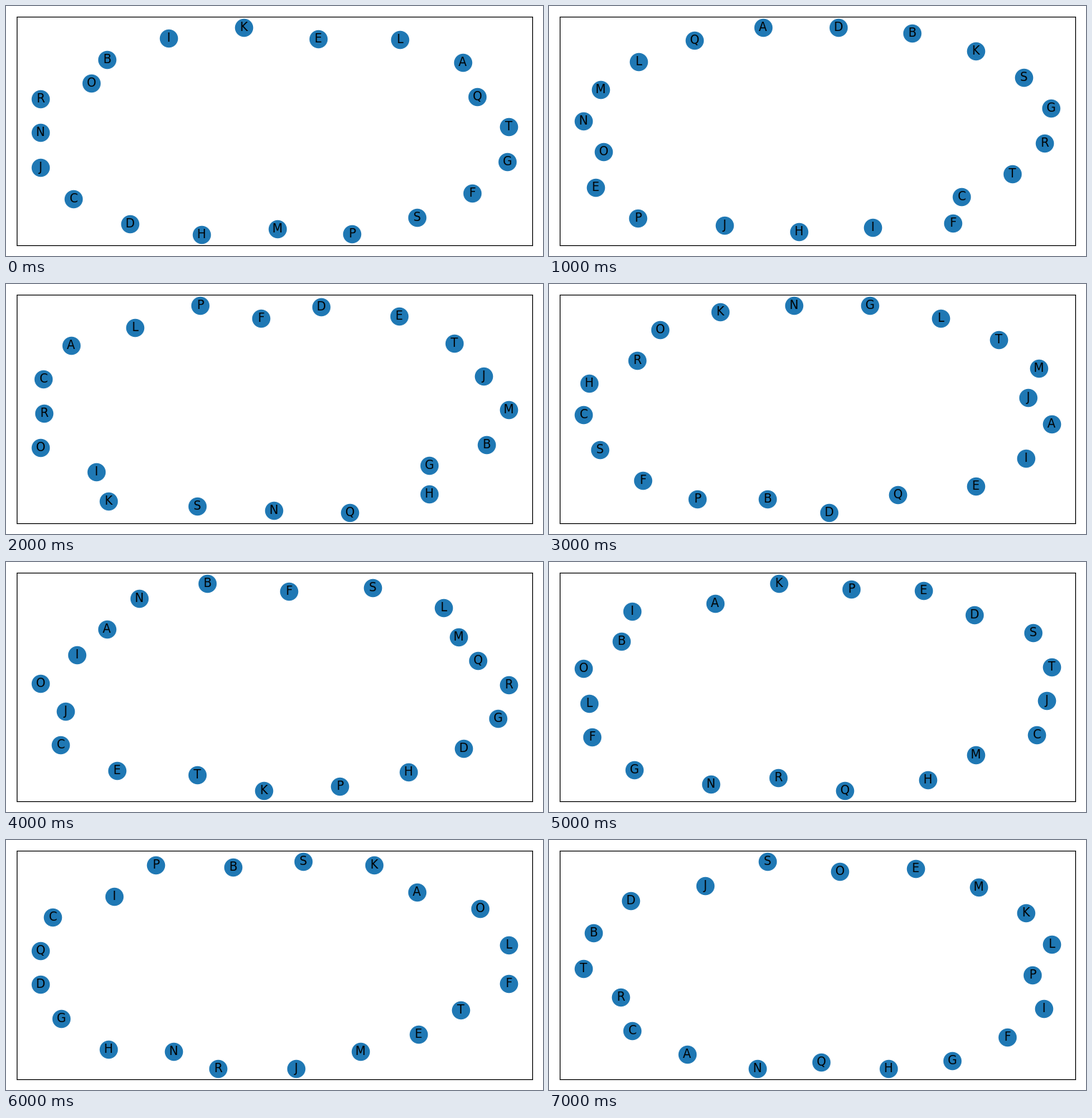
A matplotlib script that plays this animation: 750x350 px, repeating every 8000 ms.

```python
import numpy as np
import matplotlib.pyplot as plt
from matplotlib.animation import FuncAnimation

W, H, PAD = 750, 350, 15
LETTERS = "ABCDEFGHIJKLMNOPQRST"
N = len(LETTERS)
STEP_MS = 1000
LOW, HIGH = np.array([48, 30]), np.array([702, 320])
CENTER, RADII = (LOW + HIGH) / 2, (HIGH - LOW) / 2
INNER = 0.89


def ring(order, inner, **keys):
    """Spread nodes evenly clockwise between key nodes, some set inward."""
    slots = [order.index(c) for c in keys] + [N]
    x, y = ((np.array(list(keys.values())) - CENTER) / RADII).T
    angle = np.unwrap(np.append(np.arctan2(y, x), np.arctan2(y[0], x[0])))
    radius = np.hypot(x, y)
    radius = np.append(radius, radius[0])

    turn = np.interp(range(N), slots, angle)
    reach = np.interp(range(N), slots, radius)
    reach *= [INNER if c in inner else 1 for c in order]
    unit = np.column_stack([np.cos(turn), np.sin(turn)]) * reach[:, None]
    pos = np.clip(np.round(CENTER + RADII * unit), LOW, HIGH)
    return pos[[order.index(c) for c in LETTERS]]


def spring_ring(seed, steps=50):
    """Let unlinked nodes repel each other, then fit them into the box."""
    pos = np.random.default_rng(seed).random((N, 2))
    heat = 0.1 * np.ptp(pos, axis=0).max()
    cool = heat / (steps + 1)
    for _ in range(steps):
        delta = pos[:, None] - pos[None]
        dist = np.maximum(np.linalg.norm(delta, axis=2), 0.01)
        push = (delta / (N * dist ** 2)[..., None]).sum(axis=1)
        size = np.linalg.norm(push, axis=1, keepdims=True)
        pos += push * heat / np.where(size < 0.01, 0.1, size)
        heat -= cool
    unit = (pos - pos.min(axis=0)) / np.ptp(pos, axis=0)
    return np.round(LOW + unit * (HIGH - LOW))


layouts = [
    ring("ROBIKELAQTGFSPMHDCJN", inner="OEQM", R=(48, 130), B=(141, 75),
         A=(638, 79), S=(574, 296), D=(173, 305)),
    ring("NMLQADBKSGRTCFIHJPEO", inner="IHJO", N=(48, 161), A=(299, 30),
         G=(701, 143), C=(576, 267), F=(564, 304), P=(124, 297)),
    spring_ring(seed=3),
    ring("CHROKNGLTMJAIEQDBPFS", inner="RJQB", C=(48, 183), K=(239, 39),
         M=(684, 118), A=(702, 196), D=(391, 320), F=(131, 275)),
    ring("OIANBFSLMQRGDHPKTECJ", inner="IAFMQTJ", O=(48, 170), B=(281, 30),
         L=(611, 64), R=(702, 172), K=(360, 320), C=(76, 256)),
    spring_ring(seed=6),
    ring("DQCIPBSKAOLFTEMJRNHG", inner="IBATEMN", D=(48, 202), P=(209, 35),
         O=(662, 96), F=(702, 201), R=(296, 320), H=(143, 293)),
    ring("TBDJSOEMKLPIFGHQNACR", inner="JOPQR", T=(48, 180), S=(305, 30),
         L=(702, 146), G=(563, 309), N=(291, 320)),
]

fig = plt.figure(figsize=(W / 100, H / 100), dpi=100, facecolor="white")
ax = fig.add_axes([PAD / W, PAD / H, 1 - 2 * PAD / W, 1 - 2 * PAD / H])
ax.set(xlim=(PAD, W - PAD), ylim=(H - PAD, PAD), xticks=[], yticks=[])

start = layouts[0]
nodes = ax.scatter(start[:, 0], start[:, 1], s=300, c="#1f78b4", zorder=2)
labels = [ax.text(x, y, c, size=12, family="DejaVu Sans", color="black",
                  ha="center", va="center", zorder=3)
          for c, (x, y) in zip(LETTERS, start)]


def draw(step):
    pos = layouts[step]
    nodes.set_offsets(pos)
    for label, xy in zip(labels, pos):
        label.set_position(xy)
    return [nodes, *labels]


anim = FuncAnimation(fig, draw, frames=len(layouts), interval=STEP_MS,
                     repeat=True, repeat_delay=0)
plt.show()
```
